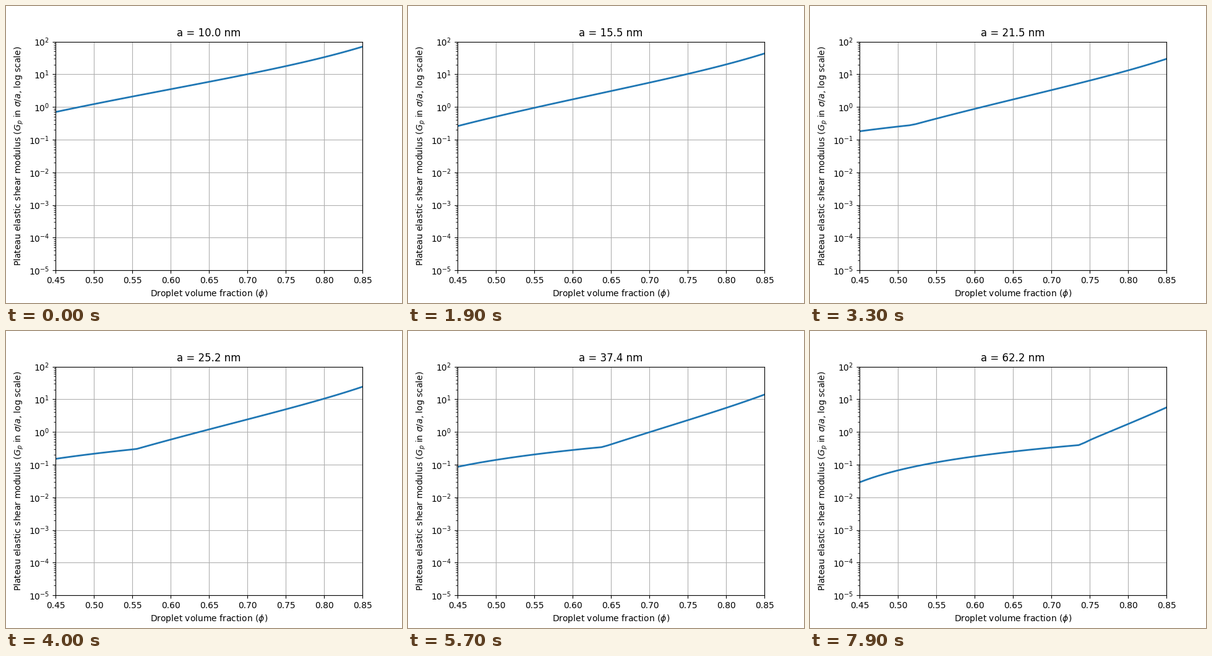
Animation, 640 px wide and 480 px high, one loop 8 s. Source, as a matplotlib script:

```python
import numpy as np
import matplotlib.pyplot as plt
from matplotlib.animation import FuncAnimation

FRAMES, INTERVAL = 80, 100
PHI_C = 0.646            # jamming volume fraction
STIFFNESS = 1.53         # interfacial restoring coefficient
KAPPA = 0.25             # inverse screening length, 1/nm
REPULSION = 10.55

phi = np.linspace(0.45, 0.85, 50)
radii = np.logspace(1, 3, 200)[:FRAMES]


def repulsion(deform, a):
    """Screened repulsion between droplets of radius a."""
    gap = 2 * a * (((PHI_C + deform) / phi) ** (1 / 3) - 1)
    gap = np.maximum(gap, 1e-3)
    kh = KAPPA * gap
    far = np.exp(-0.057 * np.maximum(gap - 12.3, 0))
    return REPULSION * a * (1 + kh) * np.exp(-kh) / gap ** 2 * far


def modulus(a):
    """Balance repulsion against deformation, which is capped at full packing."""
    lo, hi = np.zeros_like(phi), np.full_like(phi, 1 - PHI_C)
    for _ in range(45):
        mid = (lo + hi) / 2
        push = repulsion(mid, a) > STIFFNESS * mid
        lo, hi = np.where(push, mid, lo), np.where(push, hi, mid)
    return phi * repulsion(hi, a)


fig, ax = plt.subplots(figsize=(6.4, 4.8), dpi=100)
line, = ax.semilogy(phi, modulus(radii[0]), lw=2)
ax.set_xlim(0.45, 0.85)
ax.set_ylim(1e-5, 1e2)
ax.set_xlabel(r"Droplet volume fraction ($\phi$)")
ax.set_ylabel(r"Plateau elastic shear modulus ($G_p$ in $\sigma/a$, log scale)")
ax.grid(True)
title = ax.set_title("")


def update(i):
    a = radii[i]
    line.set_ydata(modulus(a))
    title.set_text(f"a = {a:.1f} nm")
    return line, title


anim = FuncAnimation(fig, update, frames=FRAMES, interval=INTERVAL,
                     repeat=True, repeat_delay=0)
plt.show()
```
